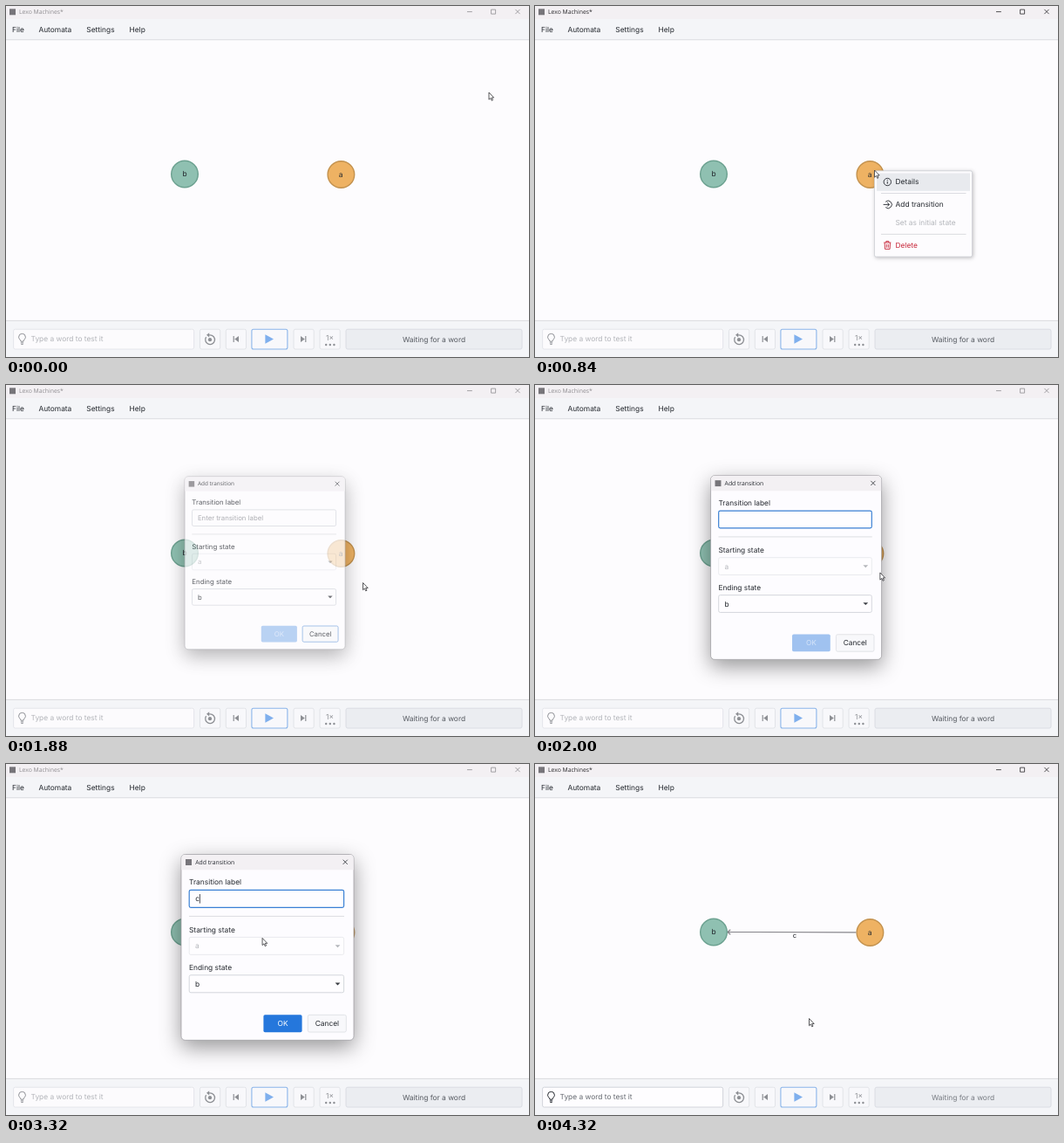
Animation of 600x402 px, one loop 4360 ms. Source, as an HTML page:

```html
<!DOCTYPE html>
<html lang="en">
<head>
<meta charset="utf-8">
<title>Lexo Machines</title>
<style>
  html, body { margin: 0; width: 100%; height: 100%; overflow: hidden; background: #fdfcfe; }
  svg { display: block; width: 600px; height: 402px; }
  text { font: 8.4px Inter, "Open Sans", sans-serif; fill: #24282e; text-rendering: geometricPrecision; white-space: pre; }
  .mid { text-anchor: middle; }
  .cap { font: 6.85px "Open Sans", "Noto Sans", sans-serif; }
  .line { fill: none; stroke: #24282e; stroke-width: .9; }
  .sep { stroke: #d3d5da; stroke-width: .8; }
  .btn { fill: #f8f8fb; stroke: #dfe1e6; stroke-width: .9; }
  .box { fill: #fefdff; stroke: #d0d3d9; stroke-width: .9; }
  .icon { fill: #8d8f94; }
  .stroke { fill: none; stroke: #8d8f94; stroke-width: 1.3; }
  .off { fill: #b4b6bb; }

  #bar text { fill: #8f8d91; }
  #bar path { fill: none; stroke: #8f8d91; stroke-width: .8; }
  #bar.on text { fill: #29282b; }
  #bar.on path { stroke: #29282b; }

  #word .box { fill: #fcfbfd; stroke: #e2e4e9; }
  #word text { fill: #b3b5ba; }
  #word path { fill: none; stroke: #8f9196; stroke-width: 1; }
  #word.on .box { fill: #fefdff; stroke: #ced1d7; }
  #word.on text { fill: #666a71; }
  #word.on path { stroke: #24282e; }
  #status { fill: #555960; }
  #status.on { fill: #777b82; }

  #nodeA circle { fill: #eeb263; stroke: #c3924f; stroke-width: 1.4; }
  #nodeA.on circle { stroke: #b98339; stroke-width: 2; }
  #menu { filter: drop-shadow(1px 1px 2px rgba(0,0,0,.25)); }
  #dialog { filter: drop-shadow(0 8px 12px rgba(0,0,0,.4)); }
  #entry.on { stroke: #3a80d4; stroke-width: 1.2; }
  #ok rect { fill: #a0c2f0; }
  #ok text { fill: #d5e4f9; }
  #ok.on rect { fill: #2577dc; }
  #ok.on text { fill: #fff; }
  .mouse path { fill: #fff; stroke: #303034; stroke-width: .8; stroke-linejoin: round; }
</style>
</head>
<body>
<svg viewBox="0 0 600 402">
  <rect width="600" height="402" fill="#fdfcfe"/>

  <g id="bar">
    <rect width="600" height="15" fill="#f3f0f3"/>
    <rect x="4" y="3.3" width="7" height="7" fill="#77757a"/>
    <text class="cap" x="15" y="9.2">Lexo Machines*</text>
    <path d="M529 6.6h5.8M556.6 4.1h5v5h-5zM584.4 3.9l5.2 5.2M589.6 3.9l-5.2 5.2"/>
  </g>
  <rect y="15" width="600" height="23.5" fill="#f4f5f8"/>
  <path class="sep" d="M0 38.7h600"/>
  <text x="7" y="30.4">File</text>
  <text x="37.4" y="30.4">Automata</text>
  <text x="92.3" y="30.4">Settings</text>
  <text x="141.5" y="30.4">Help</text>

  <g id="edge">
    <path d="M368.5 192.8L221 192.4M224.3 189.8L220.8 192.4L224.3 195.2" fill="none" stroke="#858489" stroke-width="1.2"/>
    <text class="mid" x="298" y="199" style="font-size:7.6px">c</text>
  </g>
  <circle cx="205" cy="192.5" r="15.3" fill="#8fc0b1" stroke="#6ca190" stroke-width="1.4"/>
  <text class="mid" x="205" y="195.3">b</text>
  <g id="nodeA">
    <circle cx="384.4" cy="193" r="15.3"/>
    <text class="mid" x="384.2" y="195.6">a</text>
  </g>

  <rect y="360" width="600" height="42" fill="#f4f5f8"/>
  <path class="sep" d="M0 360.4h600"/>
  <g id="word">
    <rect class="box" x="8.6" y="370.2" width="207" height="22.8" rx="2"/>
    <path d="M17 384.2c0-2-2.4-2.6-2.4-5a3.9 3.9 0 0 1 7.8 0c0 2.400-2.400 3-2.400 5zM16.800 385.900h3.400M17.300 387.400h2.400"/>
    <text x="28.500" y="384.400">Type a word to test it</text>
  </g>
  <g class="btn">
    <rect x="222.500" y="370.200" width="23.200" height="22.800" rx="2"/>
    <rect x="252.300" y="370.200" width="23.200" height="22.800" rx="2"/>
    <rect x="281.900" y="370.200" width="41" height="22.800" rx="2" stroke="#8bb5ea" stroke-width="1.100"/>
    <rect x="330" y="370.200" width="23.200" height="22.800" rx="2"/>
    <rect x="360" y="370.200" width="23.200" height="22.800" rx="2"/>
  </g>
  <path class="stroke" d="M229.600 379.200A5.400 5.400 0 1 0 234 376.800H231.800"/>
  <path class="icon" d="M233.200 374.200v5.200l-3.200-2.600z"/>
  <circle class="icon" cx="234" cy="382.200" r="2.100"/>
  <path class="icon" d="M260.600 378h1.200v7h-1.200zM267 378v7l-4.800-3.500zM338 378v7l4.800-3.500zM343.200 378h1.200v7h-1.200z"/>
  <path d="M297.400 376.200v10.600l9.600-5.300z" fill="#7fafed"/>
  <text class="mid icon" x="371.500" y="383">1×</text>
  <g class="icon">
    <circle cx="367.200" cy="388" r="1.200"/><circle cx="371.800" cy="388" r="1.200"/><circle cx="376.400" cy="388" r="1.200"/>
  </g>
  <rect x="390" y="370.200" width="202" height="22.800" rx="2" fill="#ebedf1" stroke="#d8dbe1" stroke-width=".9"/>
  <text id="status" class="mid" x="491" y="384.600">Waiting for a word</text>

  <g id="menu">
    <rect x="389.400" y="188.800" width="112.200" height="98.400" rx="2" fill="#fdfcfe" stroke="#c8cbd1" stroke-width=".8"/>
    <rect id="hover" x="392" y="191.500" width="107" height="20.300" fill="#e8eaee"/>
    <path class="sep" d="M397 214.500h97.500M397 261.400h97.500"/>
    <circle class="line" cx="404.300" cy="201.500" r="4.200"/>
    <path class="line" d="M404.300 200.900v2.800M404.300 198.900v1"/>
    <text x="413.500" y="204.300">Details</text>
    <path class="line" d="M402.200 224.200a4.300 4.300 0 1 1 0 6.400M399.600 227.400h6.800M404.200 225.200l2.200 2.200l-2.200 2.200"/>
    <text x="413.500" y="230.300">Add transition</text>
    <text class="off" x="413.500" y="250.900">Set as initial state</text>
    <path class="line" style="stroke:#c8283a" d="M400.200 271h8.200M402.800 271v-1.600h3v1.600M401.100 271.200l.4 7.200h5.600l.4-7.200M403.300 272.800v4M405.300 272.800v4"/>
    <text x="413.500" y="277" style="fill:#c8283a">Delete</text>
  </g>

  <g id="dialog">
    <rect x="201" y="103.500" width="198" height="212.800" rx="4.500" fill="#fdfcff" stroke="#98979c" stroke-width=".7"/>
    <path d="M201.400 121.300V108a4 4 0 0 1 4-4.100h189.200a4 4 0 0 1 4 4.100v13.300z" fill="#f3f0f3"/>
    <rect x="206" y="109" width="7" height="7" fill="#77757a"/>
    <text class="cap" x="217.200" y="114.700">Add transition</text>
    <path class="line" style="stroke-width:.8" d="M386.600 109.700l5.200 5.200M391.800 109.700l-5.200 5.200"/>
    <text x="210" y="138.400">Transition label</text>
    <rect id="entry" class="box" x="210.200" y="144.300" width="177.400" height="20" rx="1.800"/>
    <text id="hint" class="off" x="217" y="157.200" style="fill:#8f9197">Enter transition label</text>
    <text id="typed" x="217.200" y="157.200">c</text>
    <path id="caret" d="M0 149v10.600" stroke="#24282e" stroke-width=".8"/>
    <path class="sep" d="M210 174.400h178"/>
    <text x="210" y="193">Starting state</text>
    <rect class="box" x="210.200" y="198.400" width="177.400" height="20" rx="1.800" style="stroke:#e8e9ed"/>
    <text class="off" x="217" y="211.400">a</text>
    <path class="off" d="M377.600 207.200h5.800l-2.900 3z"/>
    <text x="210" y="236.200">Ending state</text>
    <rect class="box" x="210.200" y="241.800" width="177.400" height="20" rx="1.800"/>
    <text x="217" y="255">b</text>
    <path d="M377.600 250.400h5.800l-2.900 3z" fill="#3a3d43"/>
    <g id="ok">
      <rect x="295.400" y="287.200" width="44.200" height="20" rx="1.800"/>
      <text class="mid" x="317.500" y="300.200">OK</text>
    </g>
    <rect id="cancel" class="btn" x="346.300" y="287.400" width="44" height="19.600" rx="1.800"/>
    <text class="mid" x="368.400" y="300.200">Cancel</text>
  </g>

  <g id="mouse" class="mouse">
    <path id="arrow" d="M0 0v8.200l1.900-1.700l1.300 2.800l1.300-.6l-1.300-2.700h2.500z"/>
    <path id="hand" d="M-.8.800c0-1.100 1.500-1.100 1.500 0v2.600c.3-.7 1.400-.6 1.500.2c.4-.5 1.300-.3 1.400.4c.5-.3 1.100 0 1.100.7v2.400c0 2-.9 3.300-2.600 3.300h-1.200c-1.200 0-1.900-.6-2.500-1.600l-1.900-2.900c-.5-.9.500-1.500 1.200-.9l1.500 1.200z"/>
    <path id="beam" d="M-1.600-5.400h1.200l.4.400l.4-.4h1.200M0-5v10M-1.600 5.400h1.200l.4-.4l.4.400h1.200" style="fill:none"/>
  </g>
</svg>
<script>
const LOOP = 4360, STEP = 40;
const $ = id => document.getElementById(id);
const show = (id, on) => { $(id).style.display = on ? '' : 'none'; };
const mark = (id, on) => $(id).classList.toggle('on', on);
const within = (t, a, b) => t >= a && t < b;
const smooth = p => p * p * (3 - 2 * p);
const linear = p => p;

// rows: time, then values
const MOUSE = [
  [0, 554, 99], [440, 394, 183.5], [560, 389.5, 188], [1200, 389.5, 188],
  [1360, 406, 218.5], [1480, 409.5, 226], [1880, 409.5, 226.5],
  [2440, 294, 128.5], [2640, 284, 154], [3120, 284, 154], [3640, 314.5, 291.5]
];
// opacity, scale
const DIALOG = [
  [1800, 0, .9], [1840, .35, .91], [1880, .72, .93], [1920, .9, .96], [1960, 1, .98],
  [2040, 1, 1], [3880, 1, 1], [4000, .35, .94], [4080, 0, .92]
];
const MENU = [[600, 0], [760, 1], [1800, 1], [1840, 0]];

function at(rows, t, ease) {
  if (t <= rows[0][0]) return rows[0].slice(1);
  const i = rows.findIndex(r => r[0] > t);
  if (i < 0) return rows[rows.length - 1].slice(1);
  const a = rows[i - 1], b = rows[i];
  const p = ease((t - a[0]) / (b[0] - a[0]));
  return a.slice(1).map((v, k) => v + (b[k + 1] - v) * p);
}

function drawMouse(t, x, y) {
  const onNode = t < 640 && Math.hypot(x - 384.4, y - 193) < 16;
  const inField = within(t, 2400, 3640) && y > 144 && y < 164.5;
  $('mouse').setAttribute('transform', `translate(${x} ${y})`);
  show('hand', onNode);
  show('beam', inField);
  show('arrow', !onNode && !inField);
  mark('nodeA', onNode);
}

function drawDialog(t) {
  const [alpha, scale] = at(DIALOG, t, linear);
  const k = (1 - scale) / .07;
  const focus = within(t, 1920, 3840), typed = t >= 3120;
  show('dialog', alpha > 0);
  $('dialog').style.opacity = alpha;
  $('dialog').setAttribute('transform',
    `translate(${201 + 4 * k} ${103 + 1.5 * k}) scale(${scale}) translate(-201 -103)`);
  mark('entry', focus);
  show('hint', t < 1920);
  show('typed', typed);
  show('caret', within(t, 2400, 2920) || within(t, 3120, 3640));
  $('caret').setAttribute('transform', `translate(${typed ? 222.4 : 217.6} 0)`);
  mark('ok', typed);
  $('cancel').style.stroke = t < 1920 ? '#6f9fdc' : '';
}

function draw(t) {
  const [x, y] = at(MOUSE, t, smooth);
  const [menu] = at(MENU, t, linear);
  const done = t >= 3920;
  mark('bar', within(t, 600, 1840) || done);
  mark('word', done);
  mark('status', done);
  show('edge', done);
  show('menu', menu > 0);
  $('menu').style.opacity = menu;
  $('hover').setAttribute('y', y > 219 ? 217.4 : 191.5);
  drawDialog(t);
  drawMouse(t, x, y);
}

const start = performance.now();
function tick() {
  const t = (performance.now() - start) % LOOP;
  draw(Math.floor(t / STEP) * STEP);
  requestAnimationFrame(tick);
}
tick();
</script>
</body>
</html>
```
